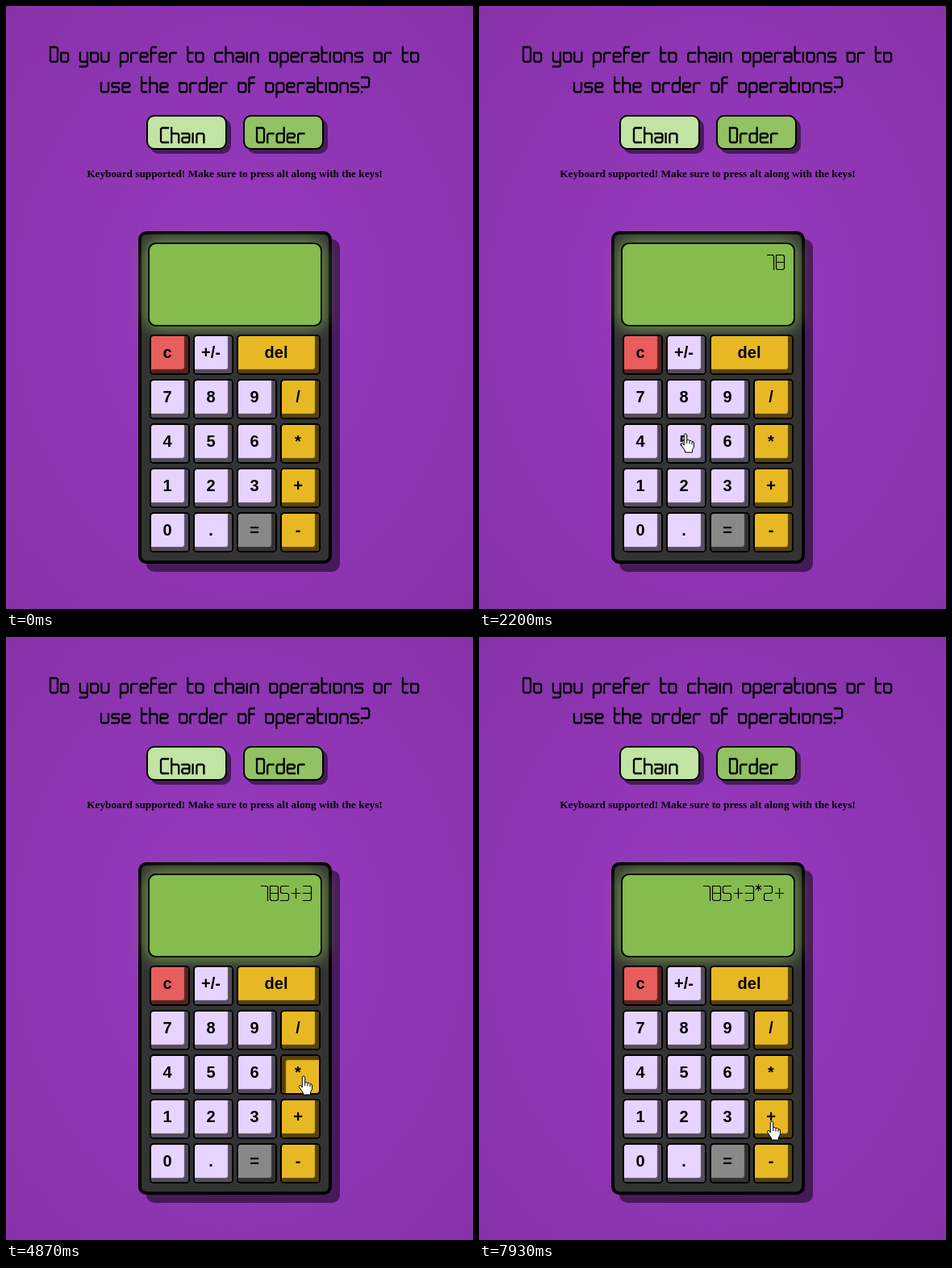
Animation of 579x747 px, one loop 8 s. Source, as an HTML page:

```html
<!DOCTYPE html>
<html lang="en">
<head>
<meta charset="utf-8">
<title>Calculator</title>
<style>
  html, body { margin: 0; width: 100%; height: 100%; overflow: hidden; }
  body { position: relative; background: radial-gradient(#963abf, #8832aa); }
  body > *, .calc > * { position: absolute; box-sizing: border-box; }
  .mode {
    top: 135px; width: 100px; height: 43px;
    border: 2px solid #000; border-radius: 10px;
    box-shadow: 5px 5px rgba(0, 0, 0, .5);
  }
  .hint {
    left: 0; top: 200px; width: 567px; margin: 0; text-align: center; white-space: nowrap;
    font: bold 13.28px/16px "Liberation Serif", Times, serif;
  }
  .calc {
    left: 164px; top: 279px; width: 240px; height: 412px;
    background: #333; border: 4px solid #000; border-radius: 10px;
    box-shadow: 10px 10px rgba(0, 0, 0, .5);
  }
  .screen {
    left: 8px; top: 10px; width: 216px; height: 104px;
    background: #86bb4e; border: 2px solid #000; border-radius: 10px;
    box-shadow: 0 0 20px #86bb4e;
  }
  .key {
    height: 50px; padding: 0 6px 6px 0; text-align: center;
    font: bold 20px/40px "Liberation Sans", Arial, sans-serif;
    border: 2px solid #000; border-radius: 5px; background: #e7d3ff;
    box-shadow: inset -5px -5px 1px rgba(0, 0, 0, .64);
  }
  .key.op { background: #e8b824; }
  .key.clear { background: #e85e5c; }
  .key.equals { background: #888; }
  .key.down { box-shadow: inset 5px 5px 1px rgba(0, 0, 0, .64); }
  svg { left: 0; top: 0; fill: none; stroke: #000; }
</style>
</head>
<body>
<div class="mode" style="left:174px;background:#c1e4a4"></div>
<div class="mode" style="left:294px;background:#92c264"></div>
<p class="hint">Keyboard supported! Make sure to press alt along with the keys!</p>
<div class="calc"><div class="screen"></div></div>
<svg width="579" height="747">
  <g id="words" stroke-width="2.3"></g>
  <g id="readout" stroke-width="1.15"></g>
  <path id="cursor" fill="#fff" stroke-linejoin="round"/>
</svg>
<script>
const $ = id => document.getElementById(id);

// A glyph is a set of strokes through grid points; point = 2 * row + column.
const headFont = {
  rows: [0, 7, 12, 18, 24], width: 9, gap: 4.2,
  narrow: { r: 7.3, f: 6, t: 6, i: .6, ' ': 6.3 },
  glyphs: {
    D: '01760', O: '01760', C: '1067', a: '237645', c: '3267', d: '17623',
    e: '453267', f: '106 23', h: '06 237', i: '26', n: '6237', o: '23762',
    p: '82376', r: '623', s: '324576', t: '067 23', u: '2673', y: '267 398',
    '?': '01354 66'
  }
};
const digitFont = {
  rows: [0, 9, 18], width: 10, gap: 3,
  narrow: { 7: 8, '+': 12, '*': 7 },
  glyphs: { 2: '013245', 3: '0154 23', 5: '102354', 7: '2015', 8: '01540 23' },
  signs: { '+': 'M1 9H11M6 3V8M6 10V15', '*': 'M3 -2V6M0 0L6 4M6 0L0 4' }
};
digitFont.glyphs[7] = '015';

const widthOf = (ch, font) => font.narrow[ch] ?? font.width;

// Joins the points of one stroke, cutting each corner.
function strokePath(points) {
  const toward = (a, b) => {
    const k = 1.5 / (Math.hypot(b[0] - a[0], b[1] - a[1]) || 1);
    return [a[0] + (b[0] - a[0]) * k, a[1] + (b[1] - a[1]) * k];
  };
  const cut = points.flatMap((p, i) =>
    points[i - 1] && points[i + 1] ? [toward(p, points[i - 1]), toward(p, points[i + 1])] : [p]);
  return 'M' + cut.join('L');
}

function glyphPath(ch, font) {
  if (font.signs?.[ch]) return font.signs[ch];
  const w = widthOf(ch, font);
  return (font.glyphs[ch] || '').split(' ').filter(Boolean).map(stroke =>
    strokePath([...stroke].map(n => [n % 2 * w, font.rows[n >> 1]]))).join('');
}

function lettering(text, x, y, font) {
  return [...text].map(ch => {
    const path = `<path d="${glyphPath(ch, font)}" transform="translate(${x} ${y})" stroke-linecap="square"/>`;
    x += widthOf(ch, font) + font.gap;
    return path;
  }).join('');
}

$('words').innerHTML =
  lettering('Do you prefer to chain operations or to', 55, 51, headFont) +
  lettering('use the order of operations?', 118, 88.5, headFont) +
  lettering('Chain', 192, 151, headFont) +
  lettering('Order', 311, 151, headFont);

function showReadout(text) {
  const width = [...text].reduce((sum, ch) => sum + widthOf(ch, digitFont) + digitFont.gap, 0);
  $('readout').innerHTML = lettering(text, 381.5 - width, 308.5, digitFont);
}

// Keypad
const kind = name => name === 'c' ? 'clear' : name === '=' ? 'equals' : /^(del|[-+*/])$/.test(name) ? 'op' : '';
const keys = {};
['c +/- del', '7 8 9 /', '4 5 6 *', '1 2 3 +', '0 . = -'].forEach((row, r) =>
  row.split(' ').forEach((name, c) => {
    const el = document.createElement('div');
    const x = 178 + 54 * c, y = 407 + 55 * r, w = name === 'del' ? 104 : 50;
    el.className = 'key ' + kind(name);
    el.textContent = name;
    el.style.cssText = `left:${x - 168}px;top:${y - 283}px;width:${w}px`;
    document.querySelector('.calc').append(el);
    keys[name] = { el, x, y, w };
  }));

// Pointer visits: x, y, arrival and leaving tick (15 per second).
// A key is held for the last ticks of its visit.
const visit = (x, y, arrive, leave, key, hold = 2) => ({ x, y, arrive, leave, key, hold });
const visits = [
  visit(572, 719, 2, 2),
  visit(310, 399, 9, 9),
  visit(216, 488, 15, 25, '7'),
  visit(250, 492, 28, 30, '8'),
  visit(256, 530, 33, 36, '5'),
  visit(368, 590, 42, 48, '+'),
  visit(316, 598, 50, 52, '3'),
  visit(369, 544, 57.5, 75, '*'),
  visit(264, 600, 79, 80, '2', 0),
  visit(361, 604, 86, 89, '+'),
  visit(314, 597, 90, 96),
  visit(362, 592, 103, 117, '+', 9),
  visit(363, 600, 119, 120)
];
const hand = 'M-1.7 14V1.7Q-1.7 0 0 0T1.7 1.7V8Q3.5 6.5 5 8.5Q7 7.5 8 9.5Q10.5 9 10.5 12V16L8.5 20V23H-.5V21L-5.5 13.5Q-5.5 10.5 -3.5 11.5L-1.7 14M1.7 8V12M5 8.5V12.5M8 9.5V13';
const arrow = 'M0 0V16.5L4 13L6.5 18.5L9 17.5L6.6 12H12Z';

function pointerAt(tick) {
  const i = visits.findIndex(v => v.leave >= tick);
  const to = visits[i], from = visits[i - 1] || to;
  const k = Math.min(1, (tick - from.leave) / (to.arrive - from.leave || 1));
  const ease = k * k * (3 - 2 * k);
  return [from.x + (to.x - from.x) * ease, from.y + (to.y - from.y) * ease];
}

function draw(tick) {
  let text = '';
  for (const name in keys) keys[name].el.classList.remove('down');
  for (const { key, leave, hold } of visits) {
    if (!key) continue;
    const down = leave - hold, up = down + Math.min(hold, 2);
    if (tick >= down && tick < up) keys[key].el.classList.add('down');
    const repeated = key === '+' && text.endsWith('+');
    if (tick >= up && !repeated) text += key;
  }
  showReadout(text);

  const [x, y] = pointerAt(tick);
  const over = Object.values(keys).some(k => x >= k.x && x < k.x + k.w && y >= k.y && y < k.y + 50);
  const cursor = $('cursor');
  cursor.setAttribute('d', over ? hand : arrow);
  cursor.setAttribute('transform', `translate(${x} ${y})`);
  cursor.style.display = tick < visits[0].arrive ? 'none' : '';
}

let last = -1;
const start = performance.now();
function loop(now) {
  const tick = Math.floor((Math.max(0, now - start) + 4) * 15 / 1000) % 120;
  if (tick !== last) draw(last = tick);
  requestAnimationFrame(loop);
}
draw(0);
requestAnimationFrame(loop);
</script>
</body>
</html>
```
